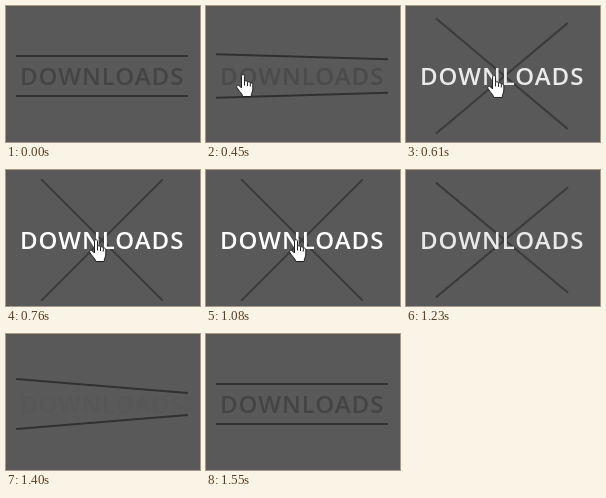
These frames come from a looping animation (194x136 px, 1860 ms). An HTML page with a canvas:

```html
<!DOCTYPE html>
<html lang="en">
<head>
<meta charset="utf-8">
<title>Downloads button</title>
<style>
  html, body { margin: 0; width: 100%; height: 100%; overflow: hidden; background: #595959; }
  canvas { display: block; }
</style>
</head>
<body>
<canvas id="stage" width="194" height="136"></canvas>
<script>
const ctx = document.getElementById('stage').getContext('2d', { alpha: false });
const LOOP = 1860;
const STEPS = [0, 450, 530, 610, 690, 760, 1080, 1160, 1230, 1320, 1400, 1470, 1550];
const ENTER = { start: 434, duration: 290 };
const LEAVE = { start: 1192, duration: 337 };
const POINTER = new Path2D(
  'M6.5 2.2 C6.5 .1 9.5 .1 9.5 2.2 V7.5 C10 6.3 12.5 6.5 12.5 8.3 ' +
  'C13.3 7.3 15.2 7.7 15.3 9.3 C16.2 8.6 17.8 9.2 17.8 10.8 V15 ' +
  'C17.8 18 16.2 19 16.2 22.5 H7.7 C7.5 19.5 4 17.5 2 13.6 ' +
  'C.9 11.7 3 10.5 4.5 12 L6.5 14 Z');
const KNUCKLES = new Path2D('M9.5 7.5 V11.5 M12.5 8.3 V12 M15.3 9.3 V12.5');

const mix = (a, b, p) => a + (b - a) * p;
const gray = v => `rgb(${v},${v},${v})`;

// The CSS "ease" curve, cubic-bezier(.25, .1, .25, 1).
function ease(x) {
  if (x <= 0) return 0;
  if (x >= 1) return 1;
  const curve = (a, b, s) => 3 * a * s * (1 - s) ** 2 + 3 * b * s * s * (1 - s) + s ** 3;
  let low = 0, high = 1;
  for (let i = 0; i < 24; i++) {
    const mid = (low + high) / 2;
    if (curve(.25, .25, mid) < x) low = mid; else high = mid;
  }
  return curve(.1, 1, low);
}

const progress = (t, { start, duration }) => ease((t - start) / duration);

function drawLine(y, angle, color) {
  ctx.save();
  ctx.translate(96, y);
  ctx.rotate(angle);
  ctx.fillStyle = color;
  ctx.fillRect(-86, -1, 172, 2);
  ctx.restore();
}

function drawPointer(t) {
  if (t < 450 || t >= 1230) return;
  const arrive = 1 - (1 - Math.min(1, (t - 450) / 240)) ** 3;
  const leaving = t >= 1160;
  ctx.save();
  ctx.translate(mix(29, 82, arrive) + (leaving ? 20 : 0), leaving ? 78 : mix(68, 69, arrive));
  ctx.fillStyle = '#fff';
  ctx.strokeStyle = '#222';
  ctx.lineWidth = 1;
  ctx.fill(POINTER);
  ctx.stroke(POINTER);
  ctx.stroke(KNUCKLES);
  ctx.restore();
}

function draw(time) {
  const t = STEPS.findLast(step => step <= time);
  const hover = progress(t, ENTER) - progress(t, LEAVE);
  const lineColor = gray(mix(48, 60, hover));
  const angle = hover * Math.PI / 4;

  ctx.fillStyle = '#595959';
  ctx.fillRect(0, 0, 194, 136);
  drawLine(50 + 20 * hover, angle, lineColor);
  drawLine(90 - 20 * hover, -angle, lineColor);

  ctx.font = '600 24px "Open Sans", sans-serif';
  ctx.letterSpacing = '1px';
  ctx.fillStyle = gray(mix(68, 255, hover));
  ctx.fillText('DOWNLOADS', 14, 79);
  drawPointer(t);
}

function tick(now) {
  draw(now % LOOP);
  requestAnimationFrame(tick);
}
draw(0);
requestAnimationFrame(tick);
</script>
</body>
</html>
```
